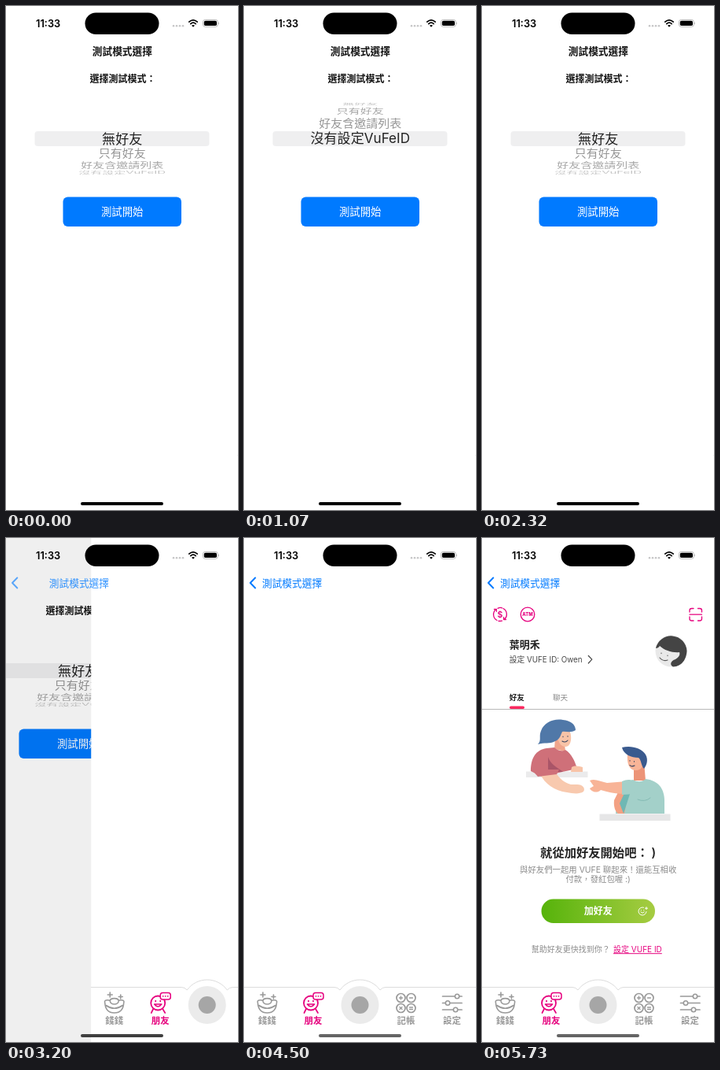
Recreate the animation shown at these times as an HTML page. Size 295 by 640 pixels, loop 8000 ms.

```html
<!DOCTYPE html>
<html lang="zh-TW">
<head>
<meta charset="utf-8">
<title>App demo</title>
<style>
html, body { margin: 0; width: 100%; height: 100%; overflow: hidden; background: #fff; }
svg { display: block; width: 295px; height: 640px; }
text { font-family: Inter, "Noto Sans CJK TC", "Noto Sans CJK", sans-serif; white-space: pre; }
.line { fill: none; stroke-linecap: round; stroke-linejoin: round; }
</style>
</head>
<body>
<svg id="stage" viewBox="0 0 295 640" xmlns="http://www.w3.org/2000/svg"></svg>
<script>
const LOOP = 8000, STEP = 110, WIDTH = 295;
const BLUE = '#007aff', PINK = '#e6007e', GRAY = '#999', MID_GRAY = '#8a8a8a';
const ROWS = ['無好友', '只有好友', '好友含邀請列表', '沒有設定VuFeID'];
const ROW_ANGLE = 0.429, WHEEL_RADIUS = 45, WHEEL_Y = 168.5;

// Text placed by its vertical centre.
const text = (x, cy, size, str, fill = '#111', weight = 400, anchor = 'start', extra = '') =>
  `<text x="${x}" y="${cy + size * 0.37}" font-size="${size}" fill="${fill}" font-weight="${weight}" text-anchor="${anchor}" ${extra}>${str}</text>`;
const mid = (cy, size, str, fill, weight, x = 147.7) => text(x, cy, size, str, fill, weight, 'middle');
const shape = (d, fill) => `<path d="${d}" fill="${fill}"/>`;
const line = (d, color, width = 1.5) => `<path class="line" d="${d}" stroke="${color}" stroke-width="${width}"/>`;
const disc = (x, y, r, fill) => `<circle cx="${x}" cy="${y}" r="${r}" fill="${fill}"/>`;
const ring = (x, y, r, color, width = 1.5) => `<circle class="line" cx="${x}" cy="${y}" r="${r}" stroke="${color}" stroke-width="${width}"/>`;
const box = (x, y, w, h, fill, r = 0, extra = '') =>
  `<rect x="${x}" y="${y}" width="${w}" height="${h}" rx="${r}" fill="${fill}" ${extra}/>`;
const rows = (cls, size, fill) => ROWS.map(r =>
  `<g class="${cls}">${mid(0, size, r, fill, 400, 0)}</g>`).join('');

const defs = `<defs>
  <clipPath id="band">${box(36, 159, 223, 19)}</clipPath>
  <clipPath id="around">${box(36, 122, 223, 37)}${box(36, 178, 223, 37.5)}</clipPath>
  <linearGradient id="green"><stop stop-color="#56b30b"/><stop offset="1" stop-color="#a6cc42"/></linearGradient>
</defs>`;

const picker = `
  ${box(0, 0, WIDTH, 640, '#fff')}
  ${mid(92.5, 12, '選擇測試模式：', '#111', 600, 148.5)}
  ${box(36.5, 159, 222, 19, '#efeff0', 4)}
  <g clip-path="url(#around)">${rows('far', 15, '#222')}</g>
  <g clip-path="url(#band)">${rows('near', 17.1, '#222')}</g>
  ${box(72.5, 242.5, 150.5, 37.5, BLUE, 6)}
  ${mid(261.5, 13.4, '測試開始', '#fff')}`;

const statusBar = `
  ${text(38, 22, 12.8, '11:33', '#000', 600)}
  ${box(100.5, 8.5, 94, 27.6, '#000', 13.8)}
  ${[213, 217, 221, 225].map(x => disc(x, 25.2, 1.25, '#c4c4c6')).join('')}
  ${line('M232.8 20.2Q238 15.6 243.2 20.2M234.8 22.6Q238 19.8 241.2 22.6', '#000', 1.7)}
  ${shape('M238 26.8L236 24.7Q238 23.2 240 24.7Z', '#000')}
  ${box(250.4, 17.4, 19, 9, 'none', 3, 'stroke="#aaa" stroke-width=".8"')}
  ${box(251.8, 18.8, 16.2, 6.2, '#000', 1.8)}
  ${shape('M270.4 20.4Q272 22 270.4 23.6Z', '#aaa')}`;

const woman = `
  ${box(56, 296.5, 78.5, 7.5, '#ebebec')}
  ${shape('M93 254L92 268L106 271L105 261Z', '#f0a58c')}
  ${shape('M97 244C105 240 113 243 113 251C114 259 111 266 105 265C98 264 95 255 97 244Z', '#f8c3a7')}
  ${shape('M75 245C79 234 91 229 103 231C113 232 119 237 119 244C113 248 106 245 102 246C100 250 99 256 93 258C86 262 79 259 71 262C76 257 72 252 75 245Z', '#5078a8')}
  ${shape('M62 296C62 280 68 269 82 267L92 266C97 271 103 271 106 269C114 274 118 283 121 293L102 297L76 303Z', '#cf7079')}
  ${shape('M84 278C87 287 95 291 103 297L84 297Z', '#a95568')}
  ${shape('M114 291C119 288 124 290 128 291L128 297L113 297Z', '#f8c3a7')}
  ${shape('M74 300L94 298C98 305 105 311 113 313L121 313C128 313 132 318 129 322C123 326 115 324 108 323C92 321 80 312 74 300Z', '#f8c9ae')}
  ${shape('M63 294L98 294L95 300L71 303Z', '#cf7079')}
  ${line('M103 252v.6M109 251.500v.6M102 258Q106 260.500 109 257', '#33415f', 1.1)}`;

const man = `
  ${shape('M193 288L193 308L208 308L206 284Z', '#ec9478')}
  ${shape('M185 274C191 270 205 273 205 282C206 290 202 296 194 295C187 294 184 286 185 274Z', '#f8b497')}
  ${shape('M178 266C188 263 203 266 208 275C212 282 209 289 206 293C202 289 203 282 199 279C190 279 180 275 178 266Z', '#3a5a8e')}
  ${shape('M172 326C172 314 181 309 192 307C199 311 205 309 208 306C224 308 232 318 232 334L232 350L170 350Z', '#a3d0c9')}
  ${shape('M173 323L168 333C167 342 170 348 173 350L181 350L186 325Z', '#f3a183')}
  ${shape('M181 324L175 337L180 350L188 325Z', '#6fb8b4')}
  ${shape('M137 308C143 305 150 309 159 311L184 309L184 324C173 326 162 323 151 320C146 325 139 322 137 318L142 315Z', '#f8b497')}
  ${shape('M178 309C186 305 194 307 198 314C199 323 191 326 178 326Z', '#a3d0c9')}
  ${line('M198 332Q207 336 214 330', '#84bbb4', 1)}
  ${line('M188 282.500v.6M193.500 283.500v.6M188 288.500Q190 291 194 289', '#33415f', 1.1)}
  ${box(149.5, 350.5, 90, 8.5, '#e6e6e7')}`;

const avatar = `
  ${disc(240.5, 143.5, 20, '#e9e9e9')}
  ${shape('M221 140A20 20 0 0 1 260.5 143.5C260 153 255 163 243 163.4C238 161 240 156 246 154C251 151 252 148 251 145C243 146 232 143 226 137C225 139 223 140 221 140Z', '#444')}
  ${line('M228 146v.6M236 149v.6M226 152Q230 157 236 155', '#555', 1.1)}`;

const content = `
  ${line('M18 90.5A8.3 8.3 0 0 0 19 104.5M28 103.5A8.3 8.3 0 0 0 27 89.5M15.5 90.5H18.4V93.3M30.5 103.5H27.6V100.7M20 89.3Q23 87.8 25.5 88.8M21 105.3Q23.5 105.8 25.5 105.1', PINK, 1.3)}
  ${mid(97, 10.5, '$', PINK, 600, 23)}
  ${ring(58, 97, 8.8, PINK, 1.3)}${mid(97, 5.8, 'ATM', PINK, 800, 58)}
  ${line('M264 94V92Q264 89.5 266.5 89.5H269M274.5 89.5H277Q279.5 89.5 279.5 92V94M264 100V102.5Q264 105 266.5 105H269M274.5 105H277Q279.5 105 279.5 102.5V100M264 97.2H279.5', PINK, 1.3)}
  ${text(34.7, 135.5, 13, '葉明禾', '#222', 600)}
  ${text(34.7, 154, 9.8, '設定 VUFE ID: Owen', '#474747')}
  ${line('M135.3 149.5L139.8 154.2L135.3 159', '#474747', 1.2)}
  ${avatar}
  ${text(34.7, 202, 9.6, '好友', '#222', 700)}${text(90, 202, 9.6, '聊天', MID_GRAY)}
  ${box(0, 217, WIDTH, 1, '#b8b8b8')}${box(35, 213.5, 19, 3.5, '#fa285f', 1.7)}
  ${woman}${man}
  ${mid(399, 15.3, '就從加好友開始吧： )', '#222', 600)}
  ${mid(421, 10.4, '與好友們一起用 VUFE 聊起來！還能互相收', MID_GRAY)}
  ${mid(433.5, 10.4, '付款，發紅包喔 :)', MID_GRAY)}
  ${box(75.5, 458.5, 144.5, 30.5, 'url(#green)', 15.2)}
  ${mid(473.7, 12, '加好友', '#fff', 600)}
  ${line('M205.5 469.2A5 5 0 1 0 209 474.5M207.5 470.2H210.5M209 468.7V471.7M202.3 472.5v.4M205.8 472.5v.4M201.8 475Q204 477.6 206.3 475', '#fff', 1)}
  ${text(62.7, 522.5, 10, '幫助好友更快找到你？', MID_GRAY)}
  ${text(167, 522.5, 10, '設定 VUFE ID', PINK, 400, 'start', 'text-decoration="underline"')}`;

const tabIcons = `
  ${line('M17.5 590C16 587 21 586 24 587.5C24 593.5 35 593.5 35 587.5C38 586 43 587 41.5 590C41 600 36 603 29.5 603S18 600 17.5 590ZM24 588C24 583.5 35 583.5 35 588M19 593.5Q29.5 601 40 593.5M24 577V583M21 580H27M37.500 580V585M35 582.500H40', GRAY, 1.6)}
  ${ring(85, 590.5, 9, PINK, 1.8)}
  ${line('M79 598L76.5 603M91 598L94 603M82 587.5v1M88 587.5v1M80.5 592Q85 598 89.5 592Z', PINK, 1.7)}
  ${box(88, 577.5, 13, 8.5, '#fff', 3, `stroke="${PINK}" stroke-width="1.5"`)}
  ${[91.5, 94.5, 97.5].map(x => disc(x, 581.8, 0.9, PINK)).join('')}
  ${[199.5, 212.5].map(x => [584, 597].map(y => ring(x, y, 5.5, GRAY, 1.7)).join('')).join('')}
  ${line('M197.5 584H201.5M199.5 582V586M210.5 584H214.5M198 595.5L201 598.5M201 595.5L198 598.5M210.5 596H214.5M210.5 598.5H214.5', GRAY, 1.3)}
  ${[[582, 271], [590.5, 259], [599, 269]].map(([y, x]) =>
    line(`M252.5 ${y}H277`, GRAY, 1.7) + `<circle cx="${x}" cy="${y}" r="2.7" fill="#fff" stroke="${GRAY}" stroke-width="1.6"/>`).join('')}`;

const tabBar = `
  ${box(0, 570, WIDTH, 70, '#fff')}
  ${disc(147.5, 592, 30.5, '#fff')}
  ${line('M0 570.5H115Q119 570.5 122 574A31.5 31.5 0 0 1 173 574Q176 570.5 180 570.5H295', '#dcdcdc', 1)}
  ${disc(147.5, 593, 24, '#ebebeb')}${disc(147.5, 593, 11, '#a6a6a6')}
  ${tabIcons}
  ${[[29.5, '錢錢'], [88, '朋友'], [206, '記帳'], [264.5, '設定']].map(([x, s]) =>
    mid(613, 11.4, s, s === '朋友' ? PINK : GRAY, 600, x)).join('')}`;

document.getElementById('stage').innerHTML = `${defs}
  <g id="first">${picker}</g>
  <rect id="dim" width="295" height="640"/>
  <g id="second">${box(0, 0, WIDTH, 640, '#fff')}<g id="content">${content}</g>${tabBar}</g>
  <g id="back">${line('M14.3 50.5L8 57L14.3 63.5', BLUE, 1.9)}</g>
  <g id="title">${text(0, 57, 12.7, '測試模式選擇', '#111', 600, 'start', 'id="boldTitle"')}
  ${text(0, 57, 12.7, '測試模式選擇', BLUE, 400, 'start', 'id="blueTitle"')}</g>
  ${statusBar}
  <rect id="home" x="95" y="630" width="105" height="4" rx="2"/>`;

const el = id => document.getElementById(id);
const far = document.querySelectorAll('.far'), near = document.querySelectorAll('.near');

// [time, wheel position in rows], held until the next entry
const WHEEL = [[0, 0], [500, 0.5], [610, 1.9], [730, 3.1], [970, 3.08], [1070, 3.05], [1180, 2.6],
  [1300, 1.7], [1420, 0.8], [1530, 0.15], [1650, -0.16], [1900, -0.12], [2010, -0.08], [2110, -0.05],
  [2210, -0.02], [2320, 0]];
const held = (table, t) => table.filter(([at]) => at <= t).pop()[1];

// Time since start, advancing in screen-refresh steps.
const stepped = (t, start) => Math.floor((t - start) / STEP) * STEP;

// Critically damped spring.
function pushProgress(t) {
  if (t < 3080) return 0;
  if (t >= 3520) return 1;
  const k = (stepped(t, 3080) + 19) / 60;
  return 1 - (1 + k) * Math.exp(-k);
}

function fadeProgress(t) {
  if (t < 4790) return 0;
  return t >= 5450 ? 1 : 1 - Math.exp(-(stepped(t, 4790) + 100) / 115);
}

function drawWheel(pos) {
  ROWS.forEach((_, i) => {
    const angle = (i - pos) * ROW_ANGLE;
    const dy = WHEEL_RADIUS * Math.sin(angle), squash = Math.max(0.01, Math.cos(angle));
    far[i].setAttribute('transform', `translate(147.7 ${WHEEL_Y + dy}) scale(1 ${squash})`);
    far[i].setAttribute('opacity', 0.5 * Math.sqrt(squash));
    near[i].setAttribute('transform', `translate(147.7 ${WHEEL_Y + dy * 1.12})`);
  });
}

function draw(t) {
  drawWheel(held(WHEEL, t));
  const p = pushProgress(t);
  el('first').setAttribute('transform', `translate(${-0.3 * WIDTH * p})`);
  el('dim').setAttribute('opacity', 0.1 * p);
  el('second').setAttribute('transform', `translate(${WIDTH * (1 - p)})`);
  el('content').setAttribute('opacity', fadeProgress(t));
  el('title').setAttribute('transform', `translate(${109.8 - 86.8 * p})`);
  el('boldTitle').setAttribute('opacity', Math.max(0, 1 - 2 * p));
  el('blueTitle').setAttribute('opacity', Math.min(1, 1.3 * p));
  el('back').setAttribute('opacity', p);
  const shade = Math.round(100 * p);
  el('home').setAttribute('fill', `rgb(${shade},${shade},${shade})`);
}

const begin = performance.now();
function frame() {
  draw((performance.now() - begin) % LOOP);
  requestAnimationFrame(frame);
}
frame();
</script>
</body>
</html>
```
